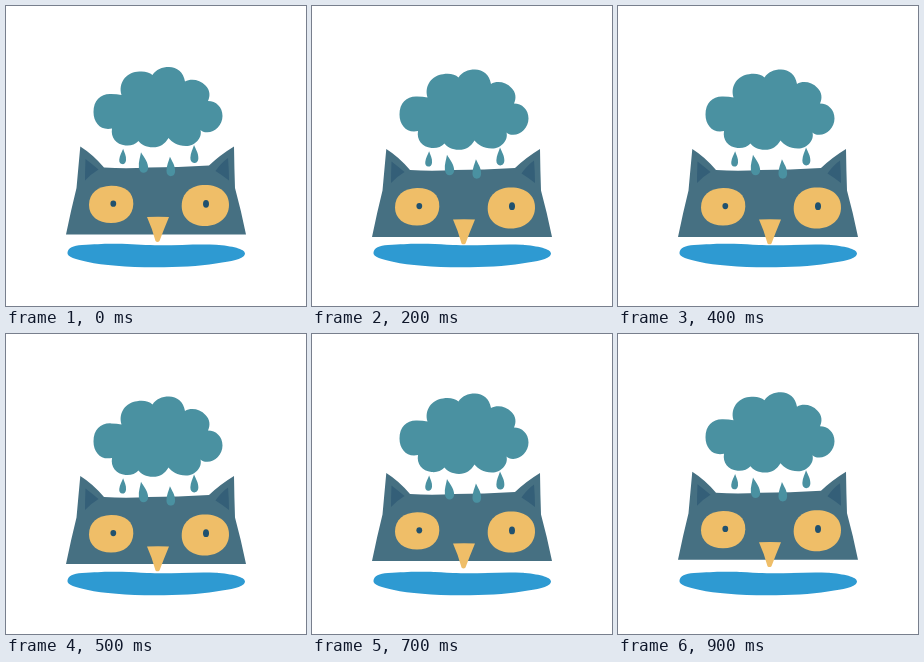
An HTML page that plays this animation: 300 px wide and 300 px high, repeating every 1 s.

```html
<!DOCTYPE html>
<html lang="en">
<head>
<meta charset="utf-8">
<title>Owl under a rain cloud</title>
<style>
  html, body { margin: 0; width: 100%; height: 100%; overflow: hidden; background: #fff; }
  svg { display: block; width: 100%; height: 100%; }
</style>
</head>
<body>
<svg viewBox="0 0 300 300">
  <defs>
    <path id="drop" d="M-0.8-9C1-5 4-1 4 4C4 7.6 2 9 0 9C-2.2 9-4 7.4-4 4C-4-1-1.800-5-0.8-9Z"/>
  </defs>
  <path fill="#2e9ad2" d="M61.500 246.500C62 242 67 239.500 76 239C92 238 100 237.300 116 237.800C130 238.200 140 239.300 154 239.300C174 239.300 192 238 210 238.800C226 240 239 243 239 247.500C239 252 230 254.500 216 256.500C200 259.500 180 261 158 261.200C126 261.700 98 259.500 82 256C70 253.500 60.500 251 61.500 246.500Z"/>
  <g id="bob">
    <path fill="#467082" d="M74.300 140.500Q87 148.500 98 161.500Q120 163 142 161.500Q172 161.500 203 159.500Q214 149 228 140.500Q228.300 162 229 182Q235 204 240 228.500H60Q65 204 70.500 182Q72.500 160 74.300 140.500Z"/>
    <g fill="#345f78">
      <path d="M79.500 153Q86 158 92.500 163.500Q85 168 79 174.500Q79 164 79.500 153Z"/>
      <path d="M222 152Q223 164 223 174.500Q216 169 209.500 165Q215 157 222 152Z"/>
    </g>
    <g fill="#efbe68">
      <path d="M83 199C83 187 92 180 105 179.700C119 179.500 127.500 186 127.300 198C127 210 118 217 105 217C92 217 83 210 83 199Z"/>
      <path d="M175.700 200C175.700 187 185 179 199 179C214 179 223 187 223 199C223 211 213 220 199 220C185 220 175.700 212 175.700 200Z"/>
      <path d="M141 211Q152 210.500 163 211Q158 223 153.500 235Q151.500 236.800 149.500 235Q146 222 141 211Z"/>
    </g>
    <g fill="#20516f">
      <ellipse cx="107.300" cy="197.700" rx="2.900" ry="3.100"/>
      <ellipse cx="200" cy="197.800" rx="3" ry="3.900"/>
    </g>
    <g fill="#4a91a1">
      <path d="M115.500 89C112 77 120 67 131 65.800C138 64.800 143 66 146.500 69C150 63.500 156 61 163 61C171 61.300 177.500 66 179 75.500C185 72 194 73.500 199.500 79.500C204 84 204.500 90 202 95C210 95 216.500 101 216.500 110C216.500 119 209 126.500 201 126.300C198 126.300 196 125.500 194.500 124C196.500 132 189 140 180 140C171 140 166 136 162.500 132C159 138 154 141.300 147 141.300C140 141.300 135 138.500 132.500 135C129 138.500 125 140 119.500 139.500C110 138.500 104.500 131.500 106 122.500C95 125 87.500 117 87.500 106C87.500 94 95 87.500 105 88Q111 88 115.500 89Z"/>
      <g id="rain"></g>
    </g>
  </g>
</svg>
<script>
  const NS = 'http://www.w3.org/2000/svg';
  const LOOP = 1000, STEP = 100, LIFT = 2.8, SWING = 1200;
  const bob = document.getElementById('bob');
  const rain = document.getElementById('rain');

  // x, y, scale, tilt
  const drops = [[117, 150.500, 0.85, 6], [137, 156.500, 1.15, -6], [164.800, 160.500, 1.08, 0], [188.500, 148, 1, 2]];
  for (const [x, y, size, tilt] of drops) {
    const use = document.createElementNS(NS, 'use');
    use.setAttribute('href', '#drop');
    use.setAttribute('transform', `translate(${x} ${y}) rotate(${tilt}) scale(${size})`);
    rain.append(use);
  }

  // The swing outlasts the loop, so the owl snaps back at the seam.
  function draw(now) {
    const t = Math.floor((now % LOOP) / STEP) * STEP;
    const dy = LIFT * Math.sin(2 * Math.PI * t / SWING);
    bob.setAttribute('transform', `translate(0 ${dy.toFixed(2)})`);
  }

  const start = performance.now();
  function tick() {
    draw(performance.now() - start);
    requestAnimationFrame(tick);
  }
  tick();
</script>
</body>
</html>
```
